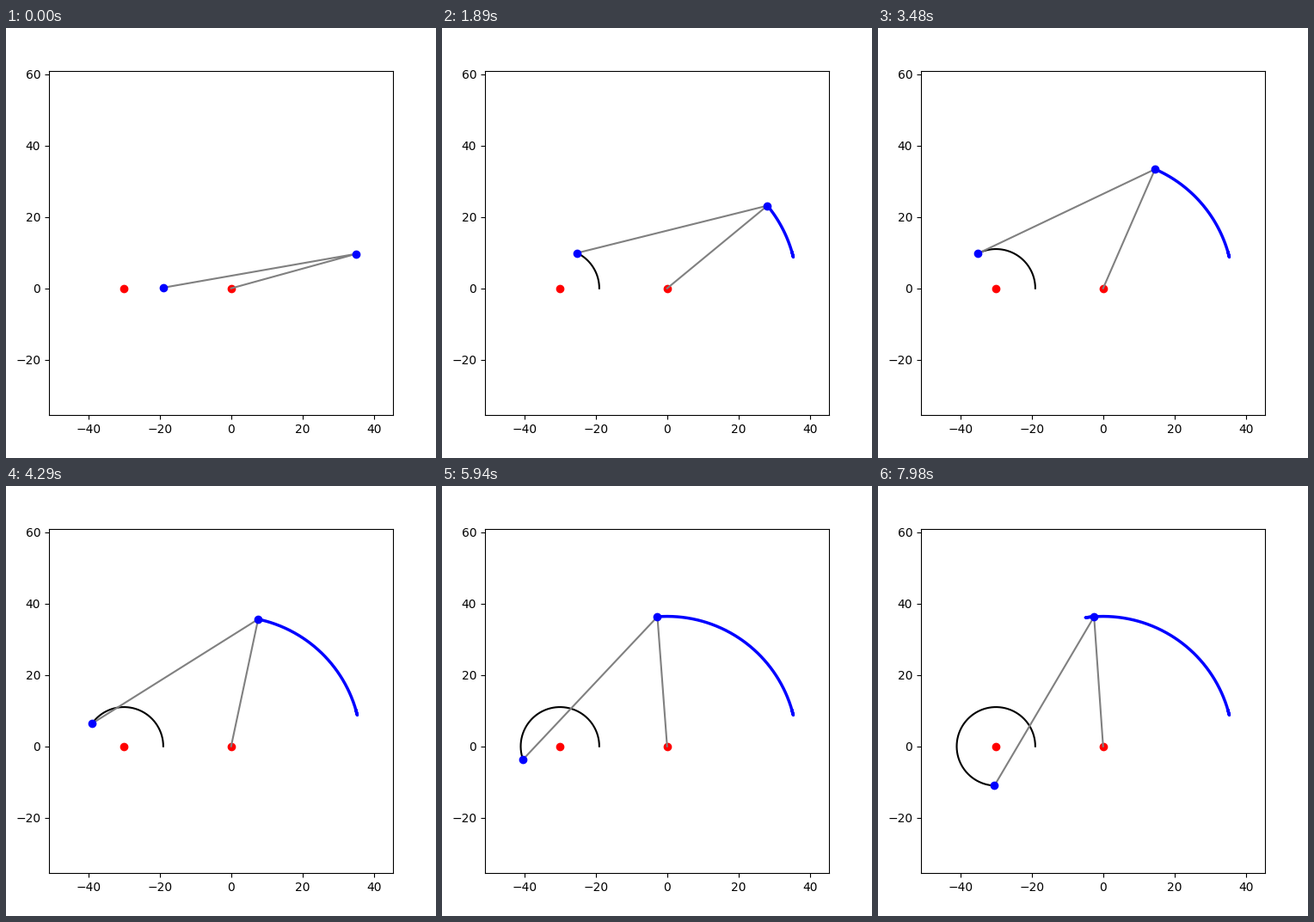
Write a matplotlib script that moves like this. It is 500x500 px and loops after 8 s.

```python
import numpy as np
import matplotlib.pyplot as plt
from matplotlib.animation import FuncAnimation

FRAMES, LOOP_MS = 267, 8000

# Four-bar linkage: crank on the left pivot, rocker on the origin
PIVOT_X, CRANK, PAD = -30, 11, 10
COUPLER = np.hypot(54, 10)
ROCKER = np.hypot(35, 10)

theta = np.linspace(0, 2 * np.pi, 360)
ax_pt = PIVOT_X + CRANK * np.cos(theta)
ay_pt = CRANK * np.sin(theta)


def rocker_tip(x, y):
    """Upper crossing of the rocker circle and the coupler circle."""
    d = np.hypot(x, y)
    along = (d**2 + ROCKER**2 - COUPLER**2) / (2 * d)
    off = np.sqrt(ROCKER**2 - along**2)
    ux, uy = x / d, y / d
    return along * ux + off * uy, along * uy - off * ux


bx_pt, by_pt = rocker_tip(ax_pt, ay_pt)

fig = plt.figure(figsize=(5, 5), dpi=100)
ax = fig.add_axes([0.1, 0.1, 0.8, 0.8])

reach = ((COUPLER + CRANK) ** 2 - PIVOT_X**2 - ROCKER**2) / (-2 * PIVOT_X)
left, right = PIVOT_X - CRANK - PAD, reach + PAD
mid, half = (ROCKER - CRANK) / 2, (right - left) / 2
ax.set_xlim(left, right)
ax.set_ylim(mid - half, mid + half)

ax.plot([PIVOT_X, 0], [0, 0], "o", color="red")
crank_path, = ax.plot([], [], color="black")
rocker_path, = ax.plot([], [], color="blue", lw=2.5)
bars, = ax.plot([], [], color="gray")
joints, = ax.plot([], [], "o", color="blue")


def update(i):
    k = i + 1
    crank_path.set_data(ax_pt[:k + 1], ay_pt[:k + 1])
    rocker_path.set_data(bx_pt[:k + 1], by_pt[:k + 1])
    bars.set_data([ax_pt[k], bx_pt[k], 0], [ay_pt[k], by_pt[k], 0])
    joints.set_data([ax_pt[k], bx_pt[k]], [ay_pt[k], by_pt[k]])
    return crank_path, rocker_path, bars, joints


def init():
    return update(0)


anim = FuncAnimation(fig, update, frames=FRAMES, init_func=init,
                     interval=LOOP_MS / FRAMES, repeat=True, repeat_delay=0)
plt.show()
```
